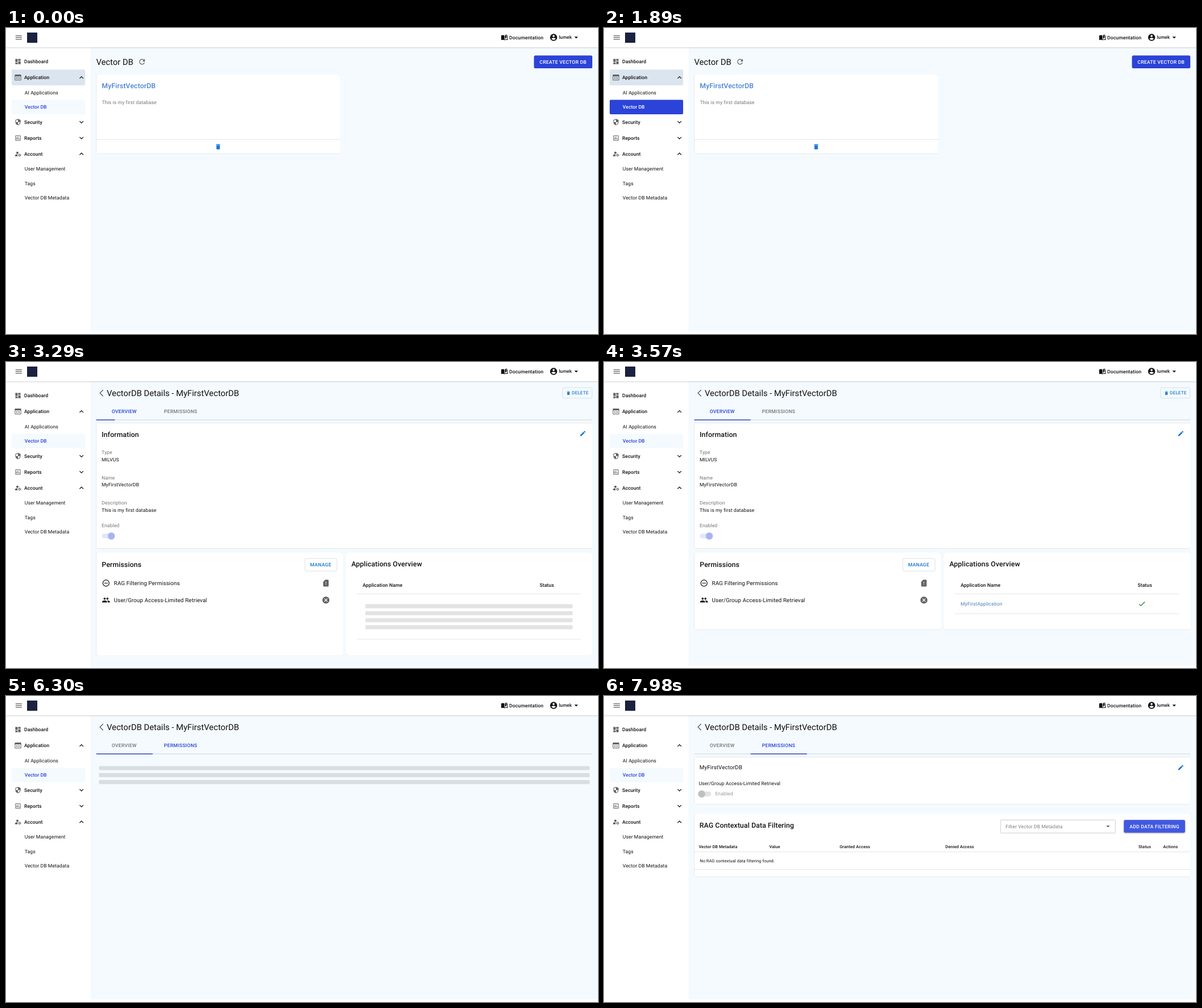
An HTML page for the animation above (8 s loop, 1040 by 539 pixels).

```html
<!DOCTYPE html>
<html lang="en">
<head>
<meta charset="utf-8">
<title>Vector DB console</title>
<style>
html, body { margin: 0; width: 100%; height: 100%; overflow: hidden; background: #fff; }
svg { display: block; width: 1040px; height: 539px; }
text { font-family: Roboto, "Liberation Sans", sans-serif; text-rendering: geometricPrecision; white-space: pre; }
.card { filter: drop-shadow(0 .8px .7px rgba(0,0,0,.32)); }
</style>
</head>
<body>
<svg id="stage" viewBox="0 0 1040 539" xmlns="http://www.w3.org/2000/svg"></svg>
<script>
const BLUE = '#2b43d8', LINK = '#1976d2', INK = '#111', GREY = '#757575', ICON = '#616161';

const P = {
  menu: 'M3 18h18v-2H3zm0-5h18v-2H3zm0-7v2h18V6z',
  dash: 'M3 13h8V3H3zm0 8h8v-6H3zm10 0h8V11h-8zm0-18v6h8V3z',
  app: 'M3 2h18a2 2 0 0 1 2 2v16a2 2 0 0 1-2 2H3a2 2 0 0 1-2-2V4a2 2 0 0 1 2-2zm0 6v12h18V8zM9.5 10l1.4 1.4-2.6 2.6 2.6 2.6L9.5 18l-4-4zm5 0l4 4-4 4-1.4-1.4 2.6-2.6-2.6-2.6z',
  shield: 'M12 1L3 5v6c0 5.55 3.84 10.74 9 12 5.16-1.26 9-6.45 9-12V5zm0 11h7c-.53 4.12-3.28 7.79-7 8.94V12H5V6.3l7-3.11z',
  chart: 'M19 3H5a2 2 0 0 0-2 2v14a2 2 0 0 0 2 2h14a2 2 0 0 0 2-2V5a2 2 0 0 0-2-2zm0 16H5V5h14zM7 10h2v7H7zm4-3h2v10h-2zm4 6h2v4h-2z',
  person: 'M10 12a4 4 0 1 0 0-8 4 4 0 0 0 0 8zm.7 1c-2.700-.1-5.200.600-7.300 1.800C2.500 15.300 2 16.300 2 17.300V20h9.300a7 7 0 0 1-.6-7z',
  up: 'M12 8l-6 6 1.410 1.410L12 10.830l4.590 4.580L18 14z',
  down: 'M16.590 8.590L12 13.170 7.410 8.590 6 10l6 6 6-6z',
  caret: 'M7 10l5 5 5-5z',
  book: 'M19 1l-5 5v11l5-4.500zM1 6v15c3-1.400 7.500-1.500 11 .5V6C9 4 4 4 1 6zm22 13.500V6l-2-1v13.500c-3-.9-6.500-.5-9 1v2c3.500-2 7.500-2 11-.5z',
  user: 'M12 2a10 10 0 1 0 0 20 10 10 0 0 0 0-20zm0 3a3 3 0 1 1 0 6 3 3 0 0 1 0-6zm0 14.200a7.200 7.200 0 0 1-6-3.220c.03-2 4-3.080 6-3.080s5.970 1.090 6 3.080a7.200 7.200 0 0 1-6 3.220z',
  refresh: 'M17.650 6.350A8 8 0 1 0 19.730 14h-2.080A6 6 0 1 1 16.220 7.780L13 11h7V4z',
  trash: 'M6 19a2 2 0 0 0 2 2h8a2 2 0 0 0 2-2V7H6zM19 4h-3.500l-1-1h-5l-1 1H5v2h14z',
  pencil: 'M3 17.250V21h3.750L17.810 9.940l-3.750-3.750zM20.710 7.040a1 1 0 0 0 0-1.410l-2.340-2.340a1 1 0 0 0-1.410 0l-1.830 1.830 3.750 3.750z',
  minus: 'M7 11v2h10v-2zm5-9a10 10 0 1 0 0 20 10 10 0 0 0 0-20zm0 18a8 8 0 1 1 0-16 8 8 0 0 1 0 16z',
  people: 'M16 11a3 3 0 1 0 0-6 3 3 0 0 0 0 6zm-8 0a3 3 0 1 0 0-6 3 3 0 0 0 0 6zm0 2c-2.330 0-7 1.170-7 3.500V19h14v-2.500C15 14.170 10.330 13 8 13zm8 0l-1 .1c1.200.8 2 2 2 3.400V19h6v-2.500c0-2.330-4.670-3.500-7-3.500z',
  alert: 'M18 2h-8L4 8v12a2 2 0 0 0 2 2h12a2 2 0 0 0 2-2V4a2 2 0 0 0-2-2zm-5 15h-2v-2h2zm0-4h-2V8h2z',
  cancel: 'M12 2a10 10 0 1 0 0 20 10 10 0 0 0 0-20zm5 13.600L15.600 17 12 13.400 8.400 17 7 15.600l3.600-3.600L7 8.400 8.400 7l3.600 3.600L15.600 7 17 8.400 13.400 12z',
  check: 'M9 16.170L4.830 12l-1.420 1.410L9 19 21 7l-1.410-1.410z'
};

const icon = (name, cx, cy, size = 12.3, fill = ICON) =>
  `<path d="${P[name]}" fill="${fill}" fill-rule="evenodd" transform="translate(${cx - size / 2} ${cy - size / 2}) scale(${size / 24})"/>`;
const text = (s, x, y, size = 8.61, fill = INK, weight = 400, gap = .092, id = '') =>
  `<text ${id && `id="${id}"`} x="${x}" y="${y}" font-size="${size}" fill="${fill}" font-weight="${weight}" letter-spacing="${gap}">${s}</text>`;
const caps = (s, x, y, fill, size = 8.61, id) => text(s, x, y, size, fill, 500, .246, id);
const head = (s, x, y, fill) => text(s, x, y, 12.3, fill, 500);
const rect = (x, y, x2, y2, fill, r = 0, more = '') =>
  `<rect x="${x}" y="${y}" width="${x2 - x}" height="${y2 - y}" rx="${r}" fill="${fill}" ${more}/>`;
const card = (x, y, x2, y2, id = '') => rect(x, y, x2, y2, '#fff', 2.5, `class="card" ${id && `id="${id}"`}`);
const rule = (x, x2, y, fill = '#e0e0e0') => rect(x, y - .4, x2, y + .4, fill);
const bars = (x, x2, y, n, fill) =>
  Array.from({ length: n }, (_, i) => rect(x, y + i * 12.3, x2, y + i * 12.3 + 7.2, fill, 1.6)).join('');
const group = (id, ...parts) => `<g id="${id}">${parts.join('')}</g>`;
const outline = (x, y, x2, y2, stroke) => rect(x, y, x2, y2, 'none', 2.4, `stroke="${stroke}" stroke-width=".7"`);

const frame = [
  rect(0, 0, 1040, 539, '#fff'),
  rect(148.5, 34, 1040, 534.5, '#f4fafe', 0, 'id="back"'),
  rect(0, 0, 1040, 34.2, '#fff', 0, 'style="filter:drop-shadow(0 .9px .9px rgba(0,0,0,.4))"'),
  icon('menu', 22.3, 16.7, 14.76),
  rect(37, 8, 55, 26, '#1b2140'),
  icon('book', 875.7, 16.5, 12.6, INK),
  text('Documentation', 884, 19.5, 8.61, INK, 500),
  icon('user', 962, 16.6, 15, INK),
  text('lumek', 971.4, 19.3, 8.1, INK, 500),
  icon('caret', 1001.7, 16.5, 15.5, INK),
  rect(10, 73.2, 139, 101, '#dbe5ef', 2, 'id="parent"'),
  rect(10, 126.4, 139, 151.9, '#f4fafe', 2, 'id="item"'),
  icon('dash', 21, 59.2), icon('app', 21, 87.2), icon('shield', 21, 165.7), icon('chart', 21, 193.8),
  icon('person', 21, 221.8),
  '<g fill="none" stroke="#616161"><circle cx="23.9" cy="224" r="1.5" stroke-width="1.1"/><circle cx="23.9" cy="224" r="2.2" stroke-width=".7" stroke-dasharray="1.15"/></g>',
  ...[['Dashboard', 62.1], ['Application', 90.1], ['Security', 168.7], ['Reports', 196.6], ['Account', 224.6]]
    .map(([s, y]) => text(s, 32, y, 8.61, INK, 500, .05)),
  ...[['AI Applications', 116.6], ['User Management', 251], ['Tags', 276.5], ['Vector DB Metadata', 302]]
    .map(([s, y]) => text(s, 32.8, y)),
  text('Vector DB', 32.8, 142.1, 8.61, BLUE, 500, .05, 'itemText'),
  icon('up', 132.6, 87.2, 14.76, INK), icon('down', 132.6, 165.8, 14.76, INK),
  icon('down', 132.6, 193.8, 14.76, INK), icon('up', 132.6, 221.8, 14.76, INK)
].join('');

const list = group('list',
  text('Vector DB', 158.4, 64.8, 14.76, INK, 400, 0),
  icon('refresh', 239, 59.5, 14.76),
  rect(927.6, 48.5, 1030, 71, BLUE, 2.5, 'class="card"'),
  caps('CREATE VECTOR DB', 937.3, 62.8, '#fff'),
  card(158.5, 82, 587, 221.5),
  head('MyFirstVectorDB', 168.3, 105.7, '#4a84d2'),
  text('This is my first database', 168.4, 133.9, 8.61, GREY),
  rule(158.5, 587, 196.3), icon('trash', 372.7, 209.2, 12.3, '#1a77dc'));

const tabs = group('tabs',
  '<path d="M170.600 49.300L165 54.800l5.600 5.500" fill="none" stroke="#555" stroke-width="1.200"/>',
  text('VectorDB Details - MyFirstVectorDB', 177, 59.8, 14.76, INK, 400, 0),
  rule(158.5, 1030, 102, '#c3cad0'),
  '<clipPath id="tabClip"><rect x="257.500" y="71" width="99" height="31.400"/></clipPath>',
  '<g clip-path="url(#tabClip)"><circle id="ripple" cx="304" cy="93.500" fill="#2b43d8"/></g>',
  caps('OVERVIEW', 185.7, 90, BLUE, 8.61, 'tab0'), caps('PERMISSIONS', 277.6, 90, GREY, 8.61, 'tab1'),
  rect(158.5, 101.3, 257.5, 102.7, '#2b3fc4', 0, 'id="bar"'));

const fields = [['Type', 'MILVUS', 162.1], ['Name', 'MyFirstVectorDB', 206.7], ['Description', 'This is my first database', 251.3]]
  .map(([k, v, y]) => text(k, 168, y, 8.61, GREY) + text(v, 168, y + 12.4)).join('');

const detail = group('detail',
  outline(978, 45.2, 1029.6, 63.8, '#c5d9ee'),
  icon('trash', 988, 54.7, 8.6, '#2a80d6'), caps('DELETE', 994, 57.4, '#2a80d6', 8),
  card(158.5, 107.5, 1030, 328.4),
  head('Information', 168, 132.4), icon('pencil', 1013.3, 126, 12.3, LINK),
  fields, text('Enabled', 168, 291, 8.61, GREY),
  rect(168.3, 302.2, 189, 310.8, '#e2e8fb', 4.3), '<circle cx="185" cy="306.500" r="6.300" fill="#a9b4ef"/>',
  card(158.5, 336, 592, 516, 'cardL'), card(597, 336, 1030, 516, 'cardR'),
  head('Permissions', 168.3, 361.3),
  outline(525, 346.2, 581.4, 368.2, '#c9d6e4'), caps('MANAGE', 534.2, 360.1, LINK),
  icon('minus', 175.7, 389.5, 14.76, INK), text('RAG Filtering Permissions', 189.5, 393, 9.84),
  icon('people', 175.7, 419.3, 14.76, INK), text('User/Group Access-Limited Retrieval', 189.5, 422.8, 9.84),
  icon('alert', 562, 389.5, 14.2), icon('cancel', 562, 419.3, 14.76),
  head('Applications Overview', 606.8, 359.8),
  text('Application Name', 626.5, 396, 8.61, INK, 500), text('Status', 937.4, 396, 8.61, INK, 500),
  rule(616, 1010, 408.2),
  group('waiting', bars(631.3, 995.5, 426.6, 4, '#e3e3e3'), rule(616, 1010, 488.2)),
  group('loaded', text('MyFirstApplication', 626.5, 428.9, 8.61, '#4a80b8'),
    icon('check', 945, 426, 14.76, '#1e8040'), rule(616, 1010, 443.6)));

const columns = [['Vector DB Metadata', 166.4], ['Value', 290.2], ['Granted Access', 414], ['Denied Access', 599.8], ['Status', 939], ['Actions', 982.2]]
  .map(([s, x]) => text(s, x, 267.9, 7.38, INK, 500)).join('');

const perms = group('perms',
  card(158.5, 107.5, 1030, 190.3),
  text('MyFirstVectorDB', 167.8, 129.3, 9.84), icon('pencil', 1013.3, 126, 12.3, LINK),
  text('User/Group Access-Limited Retrieval', 166.4, 157.1),
  rect(167.5, 168.2, 188.2, 176.8, '#e2e2e2', 4.3), '<circle cx="171.500" cy="172.500" r="6.300" fill="#bfbfbf"/>',
  text('Enabled', 195.4, 175.2, 8.61, '#9a9a9a'),
  card(158.5, 208, 1030, 318.6),
  head('RAG Contextual Data Filtering', 167.8, 232.3),
  rect(696.7, 218.4, 898.3, 241.3, '#fff', .8, 'stroke="#c2c2c2" stroke-width=".8"'),
  text('Filter Vector DB Metadata', 705.4, 232.9, 8.61, '#808080'), icon('caret', 885.5, 229.6, 14.76),
  rect(913.3, 218.3, 1020.8, 240.8, BLUE, 2.5, 'class="card" id="add"'),
  caps('ADD DATA FILTERING', 923.2, 232.7, '#fff'),
  columns, rule(158.5, 1030, 274.6),
  text('No RAG contextual data filtering found.', 168.3, 293, 7.38),
  rule(158.5, 1030, 305.6));

const stage = document.getElementById('stage');
stage.innerHTML = frame + list + tabs + detail + group('skeleton', bars(163.4, 1025.3, 123.4, 3, '#d9dee2')) + perms;

const $ = id => document.getElementById(id);
const set = (id, attrs) => { for (const k in attrs) $(id).setAttribute(k, attrs[k]); };
const show = (id, on) => set(id, { visibility: on ? 'inherit' : 'hidden' });
const clamp = v => Math.min(1, Math.max(0, v));

// cubic-bezier(.4, 0, .2, 1), solved for x by bisection
function ease(x) {
  let lo = 0, hi = 1;
  for (let i = 0; i < 24; i++) {
    const s = (lo + hi) / 2, r = 1 - s;
    if (1.2 * r * r * s + .6 * r * s * s + s * s * s < x) lo = s; else hi = s;
  }
  return lo * lo * (3 - 2 * lo);
}
const tween = (t, start, length) => ease(clamp((t - start) / length));

const LOOP = 8000, TICK = 70;
const OPEN = 3290, DATA = 3360, SWITCH = 6300, READY = 6370;

function draw(ms) {
  const t = Math.floor((ms % LOOP) / TICK) * TICK;
  const hover = t >= 1470 && t < 2730;
  const second = t >= SWITCH;
  const waiting = t >= OPEN && t < DATA;

  show('list', t < OPEN);
  show('parent', t < OPEN);
  show('tabs', t >= OPEN);
  show('detail', t >= OPEN && !second);
  show('waiting', waiting);
  show('loaded', t >= DATA && !second);
  show('skeleton', second && t < READY);
  show('perms', t >= READY);

  set('item', { fill: hover ? BLUE : '#f4fafe' });
  set('itemText', { fill: hover ? '#fff' : BLUE });
  set('back', { height: waiting ? 504 : 500.5 });
  for (const id of ['cardL', 'cardR']) set(id, { height: waiting ? 180 : 135.3 });

  set('tab0', { fill: second ? GREY : BLUE });
  set('tab1', { fill: second ? BLUE : GREY });
  set('bar', { x: 158.5 + 99 * tween(t, 6292, 300), width: 99 * tween(t, 3204, 300) });

  const grow = tween(t, 6255, 550);
  set('ripple', { r: 58 * grow, opacity: t < 6255 ? 0 : (.13 + .17 * grow) * (1 - tween(t, 6300, 600)) });

  const lift = tween(t, 7800, 250);
  const mix = (a, b) => Math.round(a + (b - a) * lift);
  set('add', { fill: `rgb(${mix(43, 66)},${mix(67, 90)},${mix(216, 224)})` });
  $('add').style.filter = `drop-shadow(0 ${.8 + .7 * lift}px ${.7 + .6 * lift}px rgba(0,0,0,.32))`;
}

const began = performance.now();
(function loop() {
  draw(performance.now() - began);
  requestAnimationFrame(loop);
})();
</script>
</body>
</html>
```
